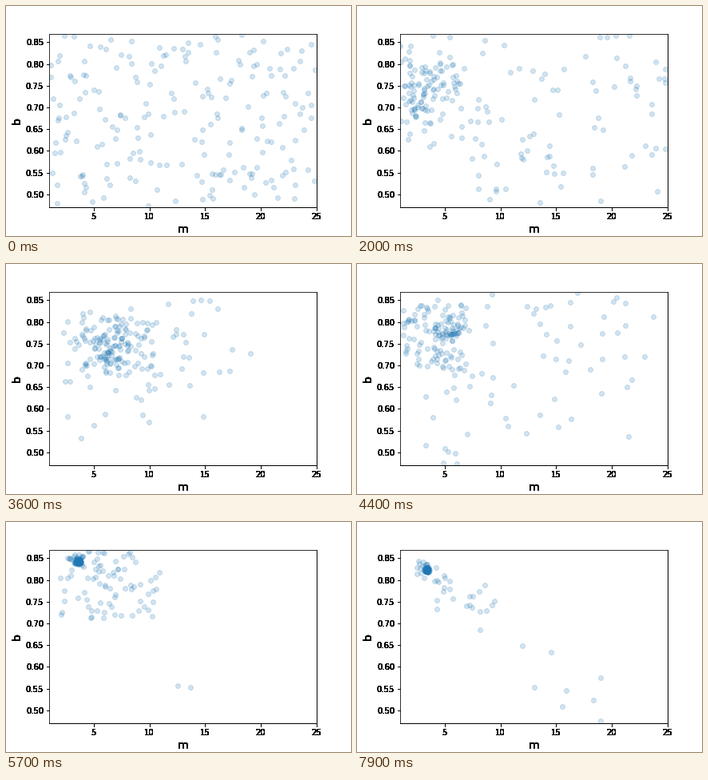
Recreate the animation shown at these times as a matplotlib script. Size 432 px wide and 288 px high, loop 8 s.

```python
import numpy as np
import matplotlib.pyplot as plt
from matplotlib.animation import FuncAnimation

N, FRAMES, STEP = 200, 80, 100
LOW, HIGH = np.array([1, .47]), np.array([25, .87])
SPAN = HIGH - LOW
OVERDRAW = 16
rng = np.random.default_rng(7)


def box(n, x, y, power=1):
    """Even spread; a higher power thins it out to the right."""
    u = rng.random((n, 2)) ** (power, 1)
    return np.column_stack([x[0] + u[:, 0] * (x[1] - x[0]),
                            y[0] + u[:, 1] * (y[1] - y[0])])


def blob(n, center, spread):
    pts = rng.normal(center, spread, (n, 2))
    return LOW + np.abs(pts - LOW) * (1, np.sign(SPAN[1]))


def trail(n, start, end, width, power=1):
    """Loose band of points from start to end."""
    u = rng.random((n, 1)) ** power
    return start + u * np.subtract(end, start) + rng.normal(0, width, (n, 2))


def swarm(*parts, mix=True):
    pts = np.vstack(parts)
    return rng.permutation(pts) if mix else pts


wide_x, wide_y = (1, 25), (.472, .868)
poses = {
    0: swarm(box(N, wide_x, wide_y)),
    9: swarm(box(112, (1, 10.8), (.6, .772)),
             blob(75, (7.2, .697), (1.5, .028)),
             trail(13, (11, .63), (24.6, .77), (.3, .05))),
    20: swarm(blob(118, (3.3, .74), (2, .05)),
              box(82, (6, 25), wide_y)),
    29: swarm(blob(118, (7.9, .722), (1.7, .02)),
              box(60, (5, 12), (.69, .81)),
              box(22, (3, 15), (.55, .83))),
    44: swarm(box(82, (1.2, 7), (.688, .84)),
              blob(42, (5.3, .776), (.8, .012)),
              box(76, (3.2, 25), wide_y, power=1.5)),
    57: swarm(blob(105, (3.6, .843), (.13, .0035)),
              blob(10, (3.4, .852), (.5, .007)),
              box(83, (2, 11), (.712, .868)),
              box(2, (10, 16), (.49, .59)), mix=False),
    79: swarm(blob(148, (3.4, .823), (.09, .0025)),
              blob(20, (3.4, .825), (.45, .011)),
              trail(22, (3.6, .8), (9, .73), (.8, .025)),
              trail(10, (9, .65), (20, .53), (3, .06)), mix=False),
}
times = np.array(list(poses))

speed = rng.uniform(.5, 1.6, (N, 2))
phase = rng.uniform(0, 2 * np.pi, (N, 2))


def positions(i):
    """Drift between neighbouring poses with a wobble that fades at each."""
    k = min(np.searchsorted(times, i, side="right"), len(times) - 1)
    t0, t1 = times[k - 1], times[k]
    u = (i - t0) / (t1 - t0)
    a, b = poses[t0], poses[t1]
    reach = np.linalg.norm((b - a) / SPAN, axis=1, keepdims=True) * SPAN
    wander = .3 * reach * np.sin(np.pi * u) * np.sin(speed * i + phase)
    return a + (b - a) * u + wander


def overdraw(artist):
    """Draw an artist repeatedly so its antialiased edges turn solid."""
    draw = artist.draw

    def draw_all(renderer):
        for _ in range(OVERDRAW):
            draw(renderer)

    artist.draw = draw_all


fig = plt.figure(figsize=(6, 4), dpi=72, facecolor="white")
ax = fig.add_axes((.125, .125, .775, .755))
ax.set(xlim=(LOW[0], HIGH[0]), ylim=(LOW[1], HIGH[1]),
       xticks=range(5, 26, 5), yticks=np.arange(.5, .86, .05))
ax.yaxis.set_major_formatter("{x:.2f}")
ax.set_xlabel("m", fontsize=14)
ax.set_ylabel("b", fontsize=14)

for axis in (ax.xaxis, ax.yaxis):
    overdraw(axis.label)
    for tick in axis.get_major_ticks():
        overdraw(tick.label1)
        overdraw(tick.tick1line)
for side in ("bottom", "right"):
    overdraw(ax.spines[side])

dots = ax.scatter(*positions(0).T, color="C0", alpha=.2)


def update(i):
    dots.set_offsets(positions(i))
    return dots,


anim = FuncAnimation(fig, update, frames=FRAMES, interval=STEP,
                     repeat=True, repeat_delay=0)
plt.show()
```
